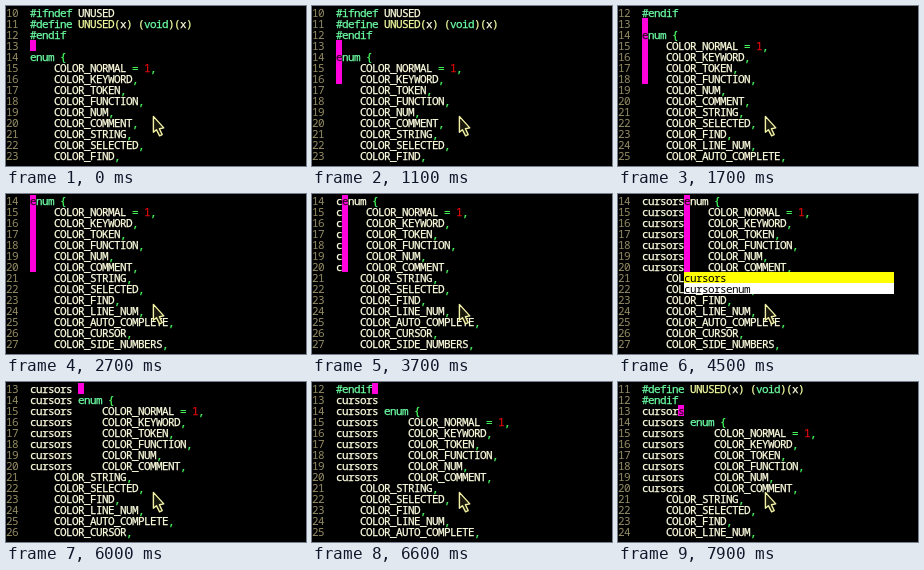
An HTML page that plays this animation: 300 by 160 pixels, repeating every 8000 ms.

```html
<!DOCTYPE html>
<html lang="en">
<head>
<meta charset="utf-8">
<title>Editing on many lines</title>
<style>
  html, body { margin: 0; width: 100%; height: 100%; overflow: hidden; background: #000; }
  #stage { position: relative; width: 300px; height: 160px; overflow: hidden; background: #000; }
  .row, .item {
    position: absolute; left: 0; height: 11px; white-space: pre;
    font: 11px/11px "Noto Sans Mono", "DejaVu Sans Mono", monospace;
    letter-spacing: -0.6px; color: #ffffe0; -webkit-text-stroke: 0.25px;
  }
  .row { width: 300px; }
  .num { position: absolute; left: 0; color: #948c62; -webkit-text-stroke: 0; }
  .code { position: absolute; left: 24px; }
  .key { color: #6cffa4; }
  .func { color: #f4ffa0; }
  .sign { color: #48ff60; }
  .digit { color: #e00808; }
  .cursor { position: absolute; width: 6px; background: #ff00dc; }
  .under { color: #300020; }
  #popup { position: absolute; width: 210px; height: 22px; background: #fff; }
  .item { width: 100%; color: #000; -webkit-text-stroke: 0; }
  .item:first-child { background: #ff0; }
  svg { position: absolute; left: 0; top: 0; }
</style>
</head>
<body>
<div id="stage">
  <div id="bars"></div>
  <div id="text"></div>
  <div id="popup" hidden></div>
  <svg width="300" height="160">
    <path d="M147.4 110.4 v15.8 l3 -2.5 l3.2 6.1 l2.6 -1.2 l-2.8 -5.9 l4.4 -.8 Z"
      fill="#18180c" stroke="#f2f0a4" stroke-width="1.4" stroke-linejoin="round"/>
  </svg>
</div>
<script>
const LOOP = 8000, ROWS = 14, TOP = 1, PITCH = 11, LEFT = 24, CHAR = 6;
const FIRST_LINE = 10, EDIT_FROM = 13, EDIT_TO = 20, WORD = "cursors ";

const names = ["NORMAL = 1", "KEYWORD", "TOKEN", "FUNCTION", "NUM", "COMMENT", "STRING",
  "SELECTED", "FIND", "LINE_NUM", "AUTO_COMPLETE", "CURSOR", "SIDE_NUMBERS"];
const lines = ["#ifndef UNUSED", "#define UNUSED(x) (void)(x)", "#endif", "", "enum {",
  ...names.map(name => `    COLOR_${name},`)];

const [bars, text, popup] = ["bars", "text", "popup"].map(id => document.getElementById(id));
const rowTop = row => TOP + PITCH * row;

// Key presses so far, for a key repeated every `gap` ms after `start`
const presses = (time, start, gap, most) =>
  Math.max(0, Math.min(most, Math.floor((time - start) / gap)));

function stateAt(time) {
  const span = EDIT_TO - EDIT_FROM;
  const extend = presses(time, 0, 300, span);
  const letters = presses(time, 3500, 120, WORD.length - 1);
  const space = presses(time, 3800, 1000, 1);
  const climb = presses(time, 5100, 100, span);
  const rise = presses(time, 6200, 300, 2);
  const fall = presses(time, 7100, 300, 2);

  const typed = letters + space;
  const to = EDIT_FROM + extend - climb - rise + fall;
  return {
    from: time < 5100 ? EDIT_FROM : to,
    to,
    col: rise ? "#endif".length : typed,
    view: Math.min(Math.max(FIRST_LINE, to - 6), EDIT_TO - climb - rise, 14),
    typed,
    ...(climb && { view: Math.min(14, EDIT_TO - climb - rise) })
  };
}

function tokenClass(token, next) {
  if (/^(#\w+|enum|void)$/.test(token)) return "key";
  if (/^\d/.test(token)) return "digit";
  if (/^\w/.test(token)) return next === "(" ? "func" : "";
  return /[()]/.test(token) ? "func" : "sign";
}

function colour(source, cursorCol) {
  let html = "";
  for (const match of source.matchAll(/#?\w+|\s+|[^\w\s]/g)) {
    const token = match[0], kind = tokenClass(token, source[match.index + token.length]);
    const at = cursorCol - match.index;
    const inside = at >= 0 && at < token.length;
    const body = inside
      ? `${token.slice(0, at)}<span class="under">${token[at]}</span>${token.slice(at + 1)}`
      : token;
    html += `<span class="${kind}">${body}</span>`;
  }
  return html;
}

function draw({ from, to, col, view, typed }) {
  const word = WORD.slice(0, typed);
  let rows = "";
  for (let row = 0; row < ROWS; row++) {
    const line = view + row;
    const edited = line >= EDIT_FROM && line <= EDIT_TO;
    const source = (edited ? word : "") + lines[line - FIRST_LINE];
    const cursorCol = line >= from && line <= to ? col : -1;
    rows += `<div class="row" style="top:${rowTop(row)}px"><span class="num">${line}</span>` +
      `<span class="code">${colour(source, cursorCol)}</span></div>`;
  }
  text.innerHTML = rows;

  const start = Math.max(from - view, 0), end = to - view + 1;
  const x = LEFT + CHAR * col;
  bars.innerHTML = `<div class="cursor" style="left:${x}px;top:${rowTop(start)}px;` +
    `height:${PITCH * (end - start)}px"></div>`;

  popup.hidden = typed < 3 || typed === WORD.length;
  popup.style.left = x + "px";
  popup.style.top = rowTop(end) + "px";
  popup.innerHTML = [word, word + "enum"]
    .map((entry, i) => `<div class="item" style="top:${i * PITCH}px">${entry}</div>`).join("");
}

let shown = "";
function tick() {
  const state = stateAt(performance.now() % LOOP);
  const key = Object.values(state).join();
  if (key !== shown) {
    shown = key;
    draw(state);
  }
  requestAnimationFrame(tick);
}
tick();
</script>
</body>
</html>
```
